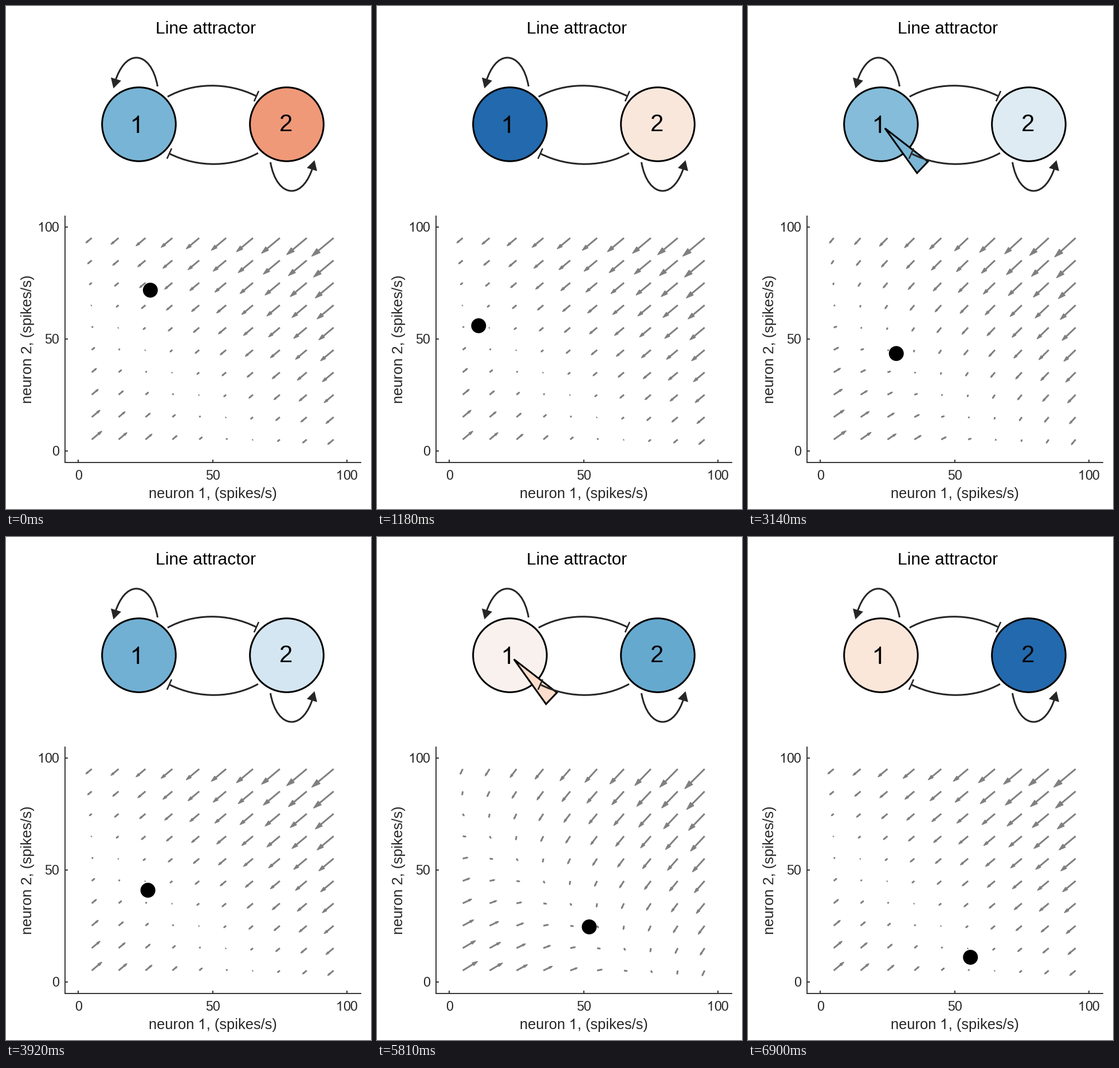
Write a matplotlib script that moves like this. It is 637 px wide and 876 px high and loops after 7.9 s.

```python
import math

import matplotlib.pyplot as plt
import numpy as np
from matplotlib.animation import FuncAnimation
from matplotlib.collections import LineCollection, PolyCollection
from matplotlib.patches import Circle, PathPatch, Polygon
from matplotlib.path import Path

W, H, DPI = 637, 876, 100
LOOP_MS, TICK_MS, STEP_MS = 7900, 20, 40
PT = 72 / DPI
DARK, GRAY = "#262626", "#808080"

# Dynamics: the sum of the rates relaxes, their difference integrates the input.
REST_SUM, START_SUM, START_DIFF = 66.7, 98.5, -44.9
RATE = 0.243
PULSE_FRAMES, PULSE_STEPS = 25, 24.65
PULSES = ((2180, 5), (5130, 10))
ARROW_MAX = 0.9 * 9 * math.sqrt(2)

fig = plt.figure(figsize=(W / DPI, H / DPI), dpi=DPI, facecolor="white")
ax = fig.add_axes((0, 0, 1, 1))
ax.set(xlim=(0, W), ylim=(H, 0))
ax.axis("off")


def to_px(r1, r2):
    return 126.2 + 4.69 * r1, 774.5 - 3.9 * r2


def rate_color(rate):
    return plt.cm.RdBu_r(rate / 100)


def stroke(points, codes=None, width=3, color=DARK, z=5):
    ax.add_patch(PathPatch(Path(points, codes), fill=False, ec=color,
                           lw=width * PT, capstyle="butt", zorder=z))


def bezier(points, z=5):
    stroke(points, [Path.MOVETO] + [Path.CURVE4] * (len(points) - 1), z=z)


def write(s, x, y, size, color=DARK, ha="center", **kw):
    ax.text(x, y, s, fontsize=size * PT, family="Liberation Sans", color=color,
            ha=ha, va="baseline", zorder=6, **kw)


def one(x, y, size, color=DARK, vertical=False):
    """A figure one without a foot; (x, y) is its origin on the baseline."""
    glyph = np.array([(.373, 0), (.285, 0), (.285, .56), (.253, .53), (.201, .5),
                      (.109, .454), (.109, .539), (.183, .574), (.238, .623),
                      (.293, .672), (.316, .719), (.373, .719)]) * size
    gx, gy = glyph.T
    pts = np.c_[x - gy, y - gx] if vertical else np.c_[x + gx, y - gy]
    ax.add_patch(Polygon(pts, fc=color, ec="none", zorder=6))


def turned(points, cx, cy):
    return [(cx - x, cy - y) for x, y in points]


def draw_circuit():
    loop = [(264.5, 140), (259, 108), (244, 90), (227.5, 90),
            (211, 90), (198, 108), (191, 130)]
    head = [(187.5, 143.5), (183, 124.5), (201, 130)]
    link = [(282, 158), (325, 134), (385, 131), (437, 157)]
    bar = [(441, 148), (433, 166)]
    for flip in (False, True):
        bezier(turned(loop, 726, 412) if flip else loop)
        ax.add_patch(Polygon(turned(head, 726, 412) if flip else head,
                             fc=DARK, ec="none", zorder=5))
        bezier(turned(link, 722, 414) if flip else link)
        stroke(turned(bar, 722, 414) if flip else bar, width=2.6)
    one(216.5, 221, 42, "black")
    write("2", 489, 218, 42, "black")


def draw_axes():
    stroke([(103, 365), (103, 795), (620, 795)], width=1.8)
    for value in (0, 50, 100):
        x, y = to_px(value, value)
        stroke([(x, 795), (x, 790)], width=1.8)
        stroke([(103, y), (108, y)], width=1.8)
        if value == 100:
            for right, base in ((93, y + 8.5), (x + 18.5, 825)):
                write("00", right, base, 23.3, ha="right")
                one(right + 1 - 1.668 * 23.3, base, 23.3)
        else:
            write(str(value), 93, y + 8.5, 23.3, ha="right")
            write(str(value), x, 825, 23.3)
    size = 25.5
    one_at = (3.391 - 8.781 / 2) * size
    write("neuron   , (spikes/s)", 360.5, 857, size)
    one(360.5 + one_at, 857, size)
    write("neuron 2, (spikes/s)", 45.5, 580, size, rotation=90,
          rotation_mode="anchor")


write("Line attractor", 348.3, 48, 30, "black")
draw_circuit()
draw_axes()

neurons = [Circle((x, 206), 64.3, ec="black", lw=3 * PT, zorder=2) for x in (232, 490)]
wedge = Polygon([(239, 213), (314, 271), (295, 291)], ec="black", lw=3 * PT,
                joinstyle="miter", zorder=3)
dot = Circle((0, 0), 13, fc="black", ec="none", zorder=8)
for patch in (*neurons, wedge, dot):
    ax.add_patch(patch)

shafts = LineCollection([], colors=GRAY, linewidths=3 * PT, capstyle="butt", zorder=4)
heads = PolyCollection([], facecolors=GRAY, edgecolors=GRAY, linewidths=1.6 * PT,
                       joinstyle="round", zorder=4)
ax.add_collection(shafts)
ax.add_collection(heads)

grid = np.arange(5, 100, 10)
R1, R2 = (g.ravel() for g in np.meshgrid(grid, grid))


def field(drive):
    """Shafts and heads of the flow, scaled so the longest arrow is constant."""
    v = (REST_SUM - R1 - R2) / 2
    u = v + drive
    scale = ARROW_MAX / np.hypot(u, v).max()
    tail = np.c_[to_px(R1, R2)]
    tip = np.c_[to_px(R1 + u * scale, R2 + v * scale)]
    along = tip - tail
    side = np.c_[-along[:, 1], along[:, 0]] * 0.09
    neck = tip - 0.3 * along
    return (np.stack([tail, tip - 0.1 * along], 1),
            np.stack([tip, neck + side, neck - side], 1))


FIELDS = {drive: field(drive) for drive in (0, 5, 10)}


def state(ms):
    """Rates of both neurons, the current drive and the step within the phase."""
    diff, drive = START_DIFF, 0
    step = int(ms // STEP_MS)
    total = REST_SUM + (START_SUM - REST_SUM) * math.exp(-RATE * step)
    for start, strength in PULSES:
        if ms < start:
            break
        step = int((ms - start) // STEP_MS)
        elapsed = step + 0.5
        driven = min(elapsed, PULSE_STEPS)
        diff += RATE * strength * driven
        excess = strength * (1 - math.exp(-RATE * driven))
        total = REST_SUM + excess * math.exp(-RATE * (elapsed - driven))
        drive = strength if step < PULSE_FRAMES else 0
    return (total + diff) / 2, (total - diff) / 2, drive, step


def draw(i):
    r1, r2, drive, step = state(i * TICK_MS + TICK_MS / 2)
    dot.center = to_px(r1, r2)
    for neuron, rate in zip(neurons, (r1, r2)):
        neuron.set_facecolor(rate_color(rate))
    wedge.set_visible(drive > 0)
    # The input colour follows a stronger drive one step late.
    wedge.set_facecolor(rate_color(59 if drive == 10 and step > 0 else 27))
    lines, tips = FIELDS[drive]
    shafts.set_segments(lines)
    heads.set_verts(tips)
    return shafts, heads, wedge, dot, *neurons


anim = FuncAnimation(fig, draw, frames=LOOP_MS // TICK_MS, interval=TICK_MS,
                     init_func=lambda: draw(0), repeat=True, repeat_delay=0, blit=False)
plt.show()
```
